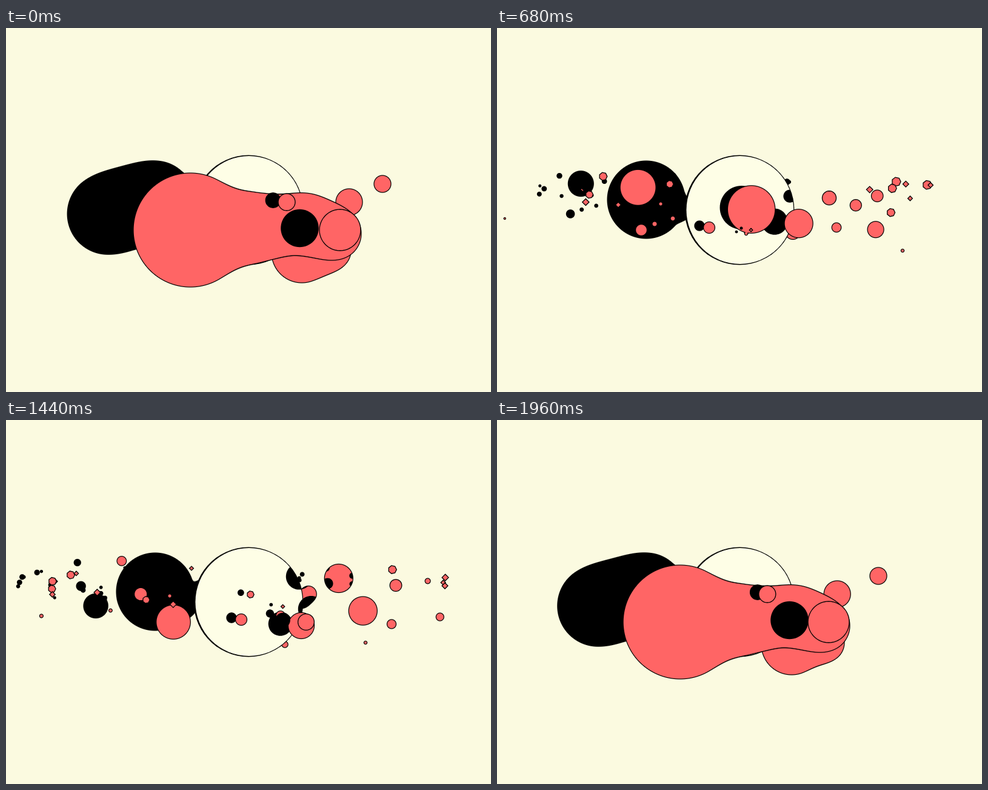
Recreate the animation shown at these times as an HTML page with a canvas. Size 800 px wide and 600 px high, loop 2000 ms.

```html
<!DOCTYPE html>
<html lang="en">
<head>
<meta charset="utf-8">
<title>Orbiting drops</title>
<style>
html, body { margin: 0; width: 100%; height: 100%; overflow: hidden; background: #fbfae0; }
canvas { display: block; }
</style>
</head>
<body>
<canvas id="stage" width="800" height="600"></canvas>
<script>
const W = 800, H = 600, TOP = 200, BAND = 240;
const LOOP = 2000, STEP = 40, LIFE = 1800;
const CREAM = '#fefee6', PINK = [255, 101, 101], BLACK = [0, 0, 0];
const PLANET = { x: 400, y: 300, r: 90 };

const ctx = document.getElementById('stage').getContext('2d');
const film = document.createElement('canvas');
film.width = W;
film.height = BAND;
const filmCtx = film.getContext('2d');
const clamp = (v, lo = 0, hi = 1) => Math.max(lo, Math.min(hi, v));
const rgb = c => `rgb(${c})`;

// x, y, r: place and full size at the start of the loop. before / after: speed on either
// side of it. lift: later rise. peak, span, rest: when, how long and from what size it swells.
const drops = [
  { layer: 'body', x: 304, y: 333, r: 94, before: .05, after: .17, lift: -.05, peak: 60, span: 560, rest: .25 },
  { layer: 'body', x: 416, y: 329, r: 56, before: .05, after: .12, lift: -.01, span: 340, rest: .42 },
  { layer: 'body', x: 492, y: 322, r: 50, before: .07, after: .1, lift: .01, span: 450, rest: .15 },
  { layer: 'body', x: 543, y: 339, r: 43, before: .1, after: .12, lift: -.01, span: 600, rest: .15 },
  { layer: 'loose', x: 551, y: 333, r: 34, before: .1, after: .06, lift: -.06, span: 550, rest: .2 },
  { layer: 'loose', x: 463, y: 287, r: 14, before: .43, after: .125, lift: -.01, span: 700, rest: .7 },
  { layer: 'far', x: 488, y: 370, r: 50, before: .05, after: 0, lift: -.05, span: 360, rest: .25 },
  { layer: 'far', x: 537, y: 367, r: 32, before: -.1, after: -.1, lift: -.04, span: 330, rest: .2 },
  { layer: 'far', x: 566, y: 287, r: 22, before: .12, after: .09, lift: -.015, span: 650, rest: .2 },
  { layer: 'far', x: 621, y: 257, r: 14, before: -.2, after: -.5, lift: 0, span: 330, rest: .1 },
  { layer: 'far', x: 270, y: 290, r: 31, before: 0, after: -.055, lift: -.04, peak: 450, span: 450, rest: .25 },
  { layer: 'far', x: 260, y: 323, r: 20, before: .36, after: 0, lift: 0, span: 440, rest: .2 },
  { layer: 'far', x: 290, y: 314, r: 19, before: .21, after: 0, lift: 0, span: 440, rest: .2 }
];

function dropAt(d, t) {
  const late = Math.max(t, 0), early = Math.min(t, 0);
  const rest = d.rest * (t < 0 ? .4 : 1);
  const swell = rest + (1 - rest) * Math.exp(-(((t - (d.peak || 0)) / d.span) ** 4));
  return {
    layer: d.layer,
    x: d.x + d.before * early + d.after * late,
    y: d.y + d.lift * late,
    r: d.r * swell * clamp((LIFE - Math.abs(t)) / 300)
  };
}

let seed = 11;
const random = () => (seed = seed * 16807 % 2147483647) / 2147483647;
const dust = Array.from({ length: 16 }, () =>
  ({ turn: random() * 2 * Math.PI, y: 255 + random() * 35, r: 4 + random() * 5 }));

function dustAt(d, t) {
  const a = d.turn + 2 * Math.PI * t / LOOP;
  return {
    far: Math.cos(a) < 0,
    x: 400 + 325 * Math.sin(a),
    y: d.y + 25 * Math.cos(a),
    r: d.r * Math.sin(Math.PI * t / LOOP)
  };
}

// The wall shows a smaller shadow of everything, far to the left.
const onWall = d => ({
  x: 246 + .71 * (d.x - 400) - .3 * (d.y - 300),
  y: 283 + .71 * (d.y - 300),
  r: .71 * d.r
});

// On the planet and the big body a shadow lies close to its drop.
const onBody = d => ({ x: d.x - 16 - Math.max(0, d.x - 450) * .5, y: d.y - 3, r: .92 * d.r });

// Smooth union of circles with a thin black outline.
function melt(circles, color) {
  const list = circles.filter(c => c.r > 1).sort((a, b) => b.r - a.r);
  if (!list.length) return;
  const image = filmCtx.createImageData(W, BAND), px = image.data;
  for (let row = 0, i = 0; row < BAND; row++) {
    for (let col = 0; col < W; col++, i += 4) {
      let dist = 1e4;
      for (const c of list) {
        const dx = col + .5 - c.x, dy = row + TOP + .5 - c.y, k = .9 * c.r;
        const d = Math.sqrt(dx * dx + dy * dy) - c.r;
        const near = Math.max(k - Math.abs(d - dist), 0);
        dist = Math.min(d, dist) - near * near / (4 * k);
      }
      if (dist > 1.2) continue;
      const inside = 1 - clamp(dist + 1.1);
      px[i] = color[0] * inside;
      px[i + 1] = color[1] * inside;
      px[i + 2] = color[2] * inside;
      px[i + 3] = 255 * clamp(1.1 - dist);
    }
  }
  filmCtx.putImageData(image, 0, 0);
  ctx.drawImage(film, 0, TOP);
}

function circle({ x, y, r }, color, outline) {
  if (r < .8) return;
  const sides = !outline || r >= 9 ? 60 : r < 5.6 ? 4 : 7;
  ctx.beginPath();
  for (let i = 0; i < sides; i++) {
    const a = i / sides * 2 * Math.PI;
    ctx.lineTo(x + r * Math.cos(a), y + r * Math.sin(a));
  }
  ctx.closePath();
  ctx.fillStyle = rgb(color);
  ctx.fill();
  if (outline) ctx.stroke();
}

function shadeBody(list) {
  ctx.globalCompositeOperation = 'source-atop';
  list.forEach(d => circle(onBody(d), BLACK));
  ctx.globalCompositeOperation = 'source-over';
}

function drawPlanet() {
  circle({ ...PLANET, r: 90.4 }, BLACK);
  ctx.beginPath();
  ctx.ellipse(400.8, 300, 88.4, 89, 0, 0, 2 * Math.PI);
  ctx.fillStyle = CREAM;
  ctx.fill();
}

function render(t) {
  // A drop outlives the loop, so its next round is already on its way.
  const live = drops.flatMap(d => [dropAt(d, t), dropAt(d, t - LOOP)]);
  const layer = name => live.filter(d => d.layer === name);
  const specks = dust.map(d => dustAt(d, t));
  const nearSpecks = specks.filter(d => !d.far);

  ctx.clearRect(0, 0, W, H);
  ctx.lineWidth = 1.3;

  melt([PLANET, ...live].map(onWall), BLACK);
  specks.forEach(d => circle(onWall(d), BLACK));
  melt(layer('far'), PINK);
  specks.filter(d => d.far).forEach(d => circle(d, PINK, true));

  drawPlanet();
  shadeBody(layer('body'));
  melt(layer('body'), PINK);
  const loose = [...layer('loose'), ...nearSpecks];
  shadeBody(loose);
  loose.forEach(d => circle(d, PINK, true));
}

let shown = -1;
function tick() {
  const t = Math.floor(performance.now() % LOOP / STEP) * STEP;
  if (t !== shown) render(shown = t);
  requestAnimationFrame(tick);
}
tick();
</script>
</body>
</html>
```
